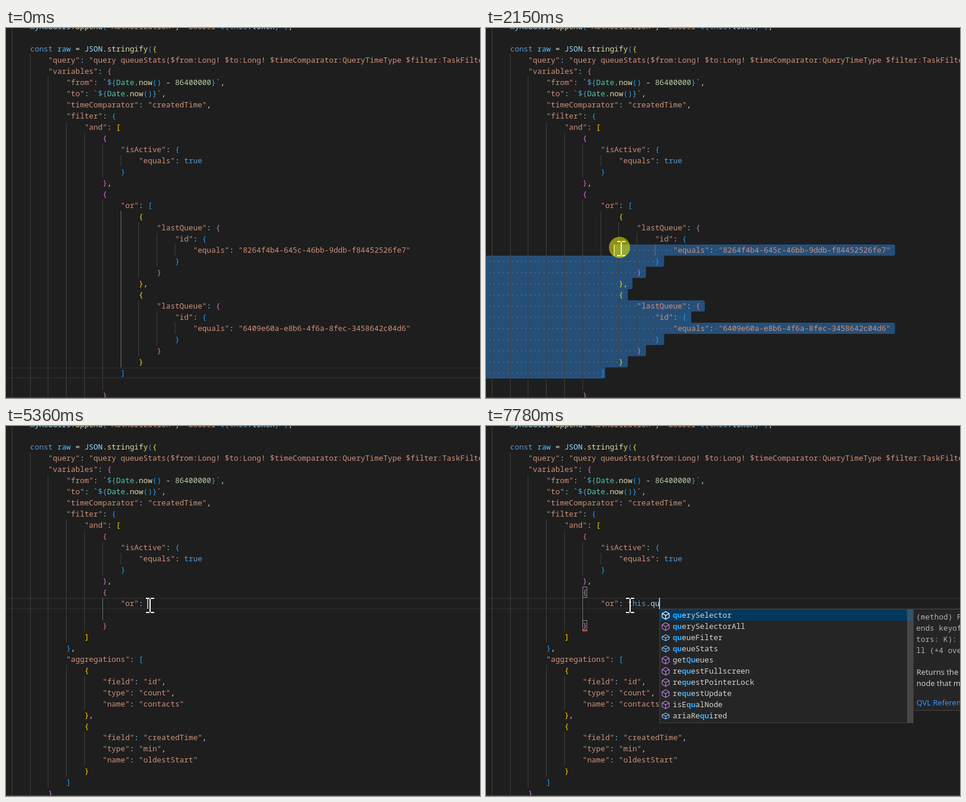
Write an HTML page with a canvas that moves like this. It is 806 by 629 pixels and loops after 8000 ms.

```html
<!DOCTYPE html>
<html lang="en">
<head>
<meta charset="utf-8">
<title>Code editor</title>
<style>
  html, body { margin: 0; height: 100%; overflow: hidden; background: #1e1e1e; }
  canvas { display: block; }
</style>
</head>
<body>
<canvas id="stage" width="806" height="629"></canvas>
<script>
const ctx = document.getElementById('stage').getContext('2d');
const LOOP = 8000, CHAR = 7.7, ROW = 19;
const colX = col => 10.2 + col * CHAR;
const lineY = line => line * ROW - 12;

// ---------- document ----------
const queue = id => ['{', '"lastQueue": {', '"id": {', `"equals": "${id}"`, '}', '}'];
const fields = (field, type, name) =>
  ['{', `"field": "${field}",`, `"type": "${type}",`, `"name": "${name}"`];
const head = [
  'myHeaders.append("Authorization", `Bearer ${this.token}`);',
  '',
  'const raw = JSON.stringify({',
  '"query": "query queueStats($from:Long! $to:Long! $timeComparator:QueryTimeType $filter:TaskFilters',
  '"variables": {',
  '"from": `${Date.now() - 86400000}`,',
  '"to": `${Date.now()}`,',
  '"timeComparator": "createdTime",',
  '"filter": {', '"and": [', '{', '"isActive": {', '"equals": true', '}', '},', '{'
];
const fullDoc = [...head, '"or": [',
  ...queue('8264f4b4-645c-46bb-9ddb-f84452526fe7'), '},',
  ...queue('6409e60a-e8b6-4f6a-8fec-3458642c04d6'), '}', ']', '', '}'];
// Each queue block closes its outer brace with the entry that follows it
const shortDoc = typed => [...head, '"or": ' + typed, '', '}', ']', '},', '"aggregations": [',
  ...fields('id', 'count', 'contacts'), '},',
  ...fields('createdTime', 'min', 'oldestStart'), '}', ']', '}'];

const STRING = '#ce9178', KEYWORD = '#569cd6', NAME = '#9cdcfe', PLAIN = '#d4d4d4', CALL = '#dcdcaa';
const BRACKETS = ['#ffd700', '#da70d6', '#179fff'];
const WORDS = { const: KEYWORD, this: KEYWORD, true: KEYWORD, raw: '#4fc1ff', Date: '#4ec9b0',
  now: CALL, stringify: CALL, append: CALL, Bearer: STRING };
const TOKEN = /"[^"]*"?|\$\{|\w+|\s+|./g;

function indent(texts) {
  let level = 1;
  return texts.map(text => {
    if (/^[}\]]/.test(text)) level--;
    const line = { text, level, end: level * 4 + text.length };
    if (/[{[]$/.test(text)) level++;
    return line;
  });
}

// ---------- timeline ----------
// time, pointer x, pointer y, caret line, caret column
const DRAG = [
  [1520, 205, 588, 31, 25], [1590, 205, 583, 31, 25], [1650, 205, 570, 31, 25], [1720, 202, 546, 30, 25],
  [1780, 198, 520, 29, 25], [1840, 199, 490, 28, 25], [1910, 203, 460, 26, 25], [1970, 209, 430, 24, 26],
  [2030, 214, 408, 23, 26], [2090, 219, 388, 21, 27], [2150, 227, 373, 20, 27], [2240, 232, 350, 19, 28],
  [2300, 236, 332, 18, 29], [2370, 240, 318, 17, 29], [2430, 246, 308, 17, 29], [2500, 252, 304, 16, 31],
  [2570, 254, 303, 16, 31], [3820, 243, 303, 16, 30], [4020, 242, 303, 16, 30]
];
const APPROACH = [[390, 552, 620], [900, 178, 554], [1180, 205, 588]];
const TYPING = [[6230, 't'], [6370, 'th'], [6500, 'thi'], [6570, 'this'], [6990, 'this.'],
  [7720, 'this.q'], [7780, 'this.qu']];
const CARET_TOGGLES = [1520, 3160, 3620, 4360, 4830, 5790, 6230, 7500, 7720];
const DELETED = 5360;
const lastAt = (list, t) => list.filter(k => k[0] <= t).pop();
const within = (t, from, to) => t >= from && t < to;

function pointerAt(t) {
  if (t < 390) return null;
  const drag = lastAt(DRAG, t);
  if (drag) return [drag[1], drag[2]];
  const now = Math.min(1180, 390 + Math.floor((t - 390) / 65.8) * 65.8);
  const [a, b] = now < 900 ? APPROACH : APPROACH.slice(1);
  const p = Math.min(1, (now - a[0]) / (b[0] - a[0])), e = p * p * (3 - 2 * p);
  return [a[1] + (b[1] - a[1]) * e, a[2] + (b[2] - a[2]) * e];
}

// ---------- drawing helpers ----------
function rect(x, y, w, h, color) {
  ctx.fillStyle = color;
  ctx.fillRect(x, y, w, h);
}
function outline(x, y, w, h, color) {
  ctx.strokeStyle = color;
  ctx.lineWidth = 1;
  ctx.strokeRect(x + .5, y + .5, w - 1, h - 1);
}
function mono(text, x, y, color, pitch = CHAR, weight = 'normal') {
  ctx.font = `${weight} ${pitch / .6}px "Noto Sans Mono", monospace`;
  ctx.fillStyle = color;
  [...text].forEach((c, i) => c !== ' ' && ctx.fillText(c, x + i * pitch, y));
}
function polyline(points, color, close) {
  ctx.beginPath();
  points.forEach(([x, y]) => ctx.lineTo(x, y));
  if (close) ctx.closePath();
  ctx.strokeStyle = color;
  ctx.lineWidth = 1.2;
  ctx.stroke();
}

// ---------- editor ----------
function drawCode(lines) {
  let depth = 2;
  lines.forEach(({ text, level }, i) => {
    let col = level * 4, template = false;
    for (const token of text.match(TOKEN) || []) {
      let color = PLAIN;
      if (token[0] === '"' || token === '`') color = STRING;
      else if (token === '${') { color = KEYWORD; template = true; }
      else if (token === '}' && template) { color = KEYWORD; template = false; }
      else if ('{[('.includes(token)) color = BRACKETS[depth++ % 3];
      else if ('}])'.includes(token)) color = BRACKETS[--depth % 3];
      else if (/^\d/.test(token)) color = '#b5cea8';
      else if (/^\w/.test(token)) color = WORDS[token] || NAME;
      else if (token === ':') color = NAME;
      mono(token, colX(col), lineY(i) + 14, color);
      col += token.length;
    }
  });
}

function drawGuides(lines, caretLine) {
  const level = i => lines[i] ? lines[i].level : 0;
  let start = caretLine, active = level(caretLine);
  if (level(start + 1) > active) active = level(++start);
  else if (level(start - 1) > active) active = level(--start);
  let first = start, last = start;
  while (level(first - 1) >= active) first--;
  while (level(last + 1) >= active) last++;
  lines.forEach((line, i) => {
    for (let k = 0; k < line.level; k++) {
      const lit = k === active - 1 && i >= first && i <= last;
      rect(Math.floor(colX(k * 4)), lineY(i), 1, ROW, lit ? '#707070' : '#404040');
    }
  });
}

function drawSelection(lines, from, col) {
  const LAST = 31;
  const right = i => i < from || i > LAST ? 0 : colX(lines[i].end) + (i < LAST ? CHAR : 0);
  for (let i = from; i <= LAST; i++) {
    const { text, level } = lines[i], x = i === from ? colX(col) : 0, r = right(i);
    ctx.fillStyle = '#264f78';
    ctx.beginPath();
    ctx.roundRect(x, lineY(i), Math.max(0, r - x), ROW,
      [0, right(i - 1) < r ? 3 : 0, right(i + 1) < r ? 3 : 0, 0]);
    ctx.fill();
    const chars = ' '.repeat(level * 4) + text;
    for (let c = i === from ? col : -1; c < chars.length; c++)
      if (c < 0 || chars[c] === ' ') rect(colX(c) + 3, lineY(i) + 9, 1.6, 1.6, 'rgba(227,228,226,.25)');
  }
}

function bracketBox(line, col) {
  const x = Math.floor(colX(col));
  rect(x, lineY(line), 8, ROW, 'rgba(0,100,0,.1)');
  outline(x, lineY(line), 8, ROW, '#888888');
}

function drawPointer([x, y], pressed) {
  const cx = Math.round(x) + 3, cy = Math.round(y) + 2;
  rect(cx - 1, cy - 11, 2, 22, '#fff');
  for (const s of [-13, 11]) {
    rect(cx - 7, cy + s, 6, 2, '#fff');
    rect(cx + 1, cy + s, 6, 2, '#fff');
  }
  if (!pressed) return;
  ctx.fillStyle = 'rgba(255,255,0,.5)';
  ctx.beginPath();
  ctx.arc(x, y, 18, 0, Math.PI * 2);
  ctx.fill();
}

// ---------- suggestions ----------
// icon kind, label, note
const KEYWORDS = [
  ['k', 'this'], ['k', 'throw'], ['s', 'throw', 'Throw Exception'], ['i', 'Touch'], ['i', 'TouchEvent'],
  ['i', 'TouchList'], ['n', 'globalThis'], ['s', 'trycatch', 'Try-Catch Statement'],
  ['i', 'transformWithVobrune', 'nolu']
];
const MEMBERS = ('f accessKey,f accessKeyLabel,m addController,m addEventListener,m after,m animate,m append,' +
  'm appendChild,f ariaAtomic,f ariaAutoComplete,f ariaBusy,f ariaChecked,m querySelector,m querySelectorAll,' +
  'f queueFilter,f queueStats,m getQueues,m requestFullscreen,m requestPointerLock,m requestUpdate,' +
  'm isEqualNode,f ariaRequired').split(',').map(s => s.split(' '));

// Positions of the query letters in the label, or null
function findLetters(label, query) {
  const hits = [];
  let at = -1;
  for (const c of query) {
    at = label.toLowerCase().indexOf(c, at + 1);
    if (at < 0) return null;
    hits.push(at);
  }
  return hits;
}

function drawIcon(kind, x, y, selected) {
  const color = selected ? '#fff' : { m: '#b180d7', f: '#75beff', i: '#75beff' }[kind] || '#c5c5c5';
  if (kind === 'k') {
    [[-7, -5, 7], [2, -5, 5], [-7, -2, 4], [-1, -2, 8], [-7, 1, 8], [3, 1, 4], [-7, 4, 5], [0, 4, 7]]
      .forEach(([dx, dy, w]) => rect(x + dx, y + dy, w, 1.2, color));
  } else if (kind === 's') {
    polyline([[x - 6, y + 6], [x - 6, y - 6], [x + 6, y - 6], [x + 6, y + 6]], color);
    for (let d = -6; d <= 6; d += 3) rect(x + d - .5, y + 5.5, 1.5, 1.5, color);
  } else if (kind === 'i') {
    for (const s of [-1, 1])
      polyline([[x + 4 * s, y - 4], [x + 6.5 * s, y - 4], [x + 6.5 * s, y + 5], [x + 4 * s, y + 5]], color);
    polyline([[x - 3, y + 1], [x, y - 2.5], [x + 3, y - 1], [x, y + 3]], color, true);
    polyline([[x - 3, y + 1], [x, y], [x + 3, y - 1]], color);
  } else if (kind === 'n') {
    mono('{}', x - 7, y + 4, color);
  } else {
    const h = kind === 'm' ? 6.5 : 5, m = kind === 'm' ? 3.2 : 2;
    polyline([[x, y - h], [x + 6, y - m], [x + 6, y + m], [x, y + h], [x - 6, y + m], [x - 6, y - m]], color, true);
    polyline([[x - 6, y - m], [x, y], [x + 6, y - m]], color);
    polyline([[x, y], [x, y + h]], color);
  }
}

function drawPanel(x, y, w, h) {
  rect(x, y, w, h, '#252526');
  outline(x, y, w, h, '#454545');
}

function drawSuggestions(items, query, col) {
  const x = Math.floor(colX(col)), y = 311, w = 432;
  const rows = items.filter(([, label]) => findLetters(label, query)).slice(0, 12);
  const h = rows.length * ROW + 4;
  drawPanel(x, y, w, h);
  rect(x + 1, y + 1, w - 2, ROW, '#04395e');
  rows.forEach(([kind, label, note = ''], i) => {
    const rowY = y + 1 + i * ROW, hits = findLetters(label, query);
    drawIcon(kind, x + 10.5, rowY + 10, i === 0);
    [...label].forEach((c, k) => {
      const hit = hits.includes(k);
      mono(c, colX(col) + 22.5 + k * CHAR, rowY + 14, hit ? '#2aaaff' : PLAIN, CHAR, hit ? 'bold' : 'normal');
    });
    mono(note, x + 421 - note.length * 6.6, rowY + 13, '#9a9a9a', 6.6);
  });
  if (items === MEMBERS)
    rect(x + w - 11, y + 1, 10, rows.length < 12 ? h - 2 : 20, 'rgba(121,121,121,.4)');
}

function drawDetails(query, col) {
  const x = Math.floor(colX(col)) + 431;
  const [code, prose] = query
    ? [['(method) ParentNode', 'ends keyof HTML', 'tors: K): El', 'll (+4 overloads)'], ['Returns the first', 'node that matches']]
    : [['(property) string', 'accessKey:', 'string'], []];
  drawPanel(x, 311, 200, 173);
  code.forEach((s, i) => mono(s, x + 5.5, 329 + i * ROW, '#b0b0b0'));
  ctx.font = '13px "Noto Sans", sans-serif';
  ctx.fillStyle = '#cccccc';
  prose.forEach((s, i) => ctx.fillText(s, x + 6, 423 + i * ROW));
  ctx.fillStyle = '#3794ff';
  ctx.fillText('QVL Reference', x + 6, 475);
}

// ---------- scene ----------
function draw(t) {
  const deleted = t >= DELETED;
  const typed = (lastAt(TYPING, t) || [0, ''])[1];
  const lines = indent(deleted ? shortDoc(typed) : fullDoc);
  const [, , , line, dragCol] = lastAt(DRAG, t) || [0, 0, 0, 31, 25];
  const col = deleted ? 30 + typed.length : dragCol;
  const selecting = !deleted && (line < 31 || col < 25);

  rect(0, 0, 806, 629, '#1e1e1e');
  if (selecting) drawSelection(lines, line, col);
  else for (const dy of [0, ROW - 2]) rect(0, lineY(line) + dy, 806, 2, '#282828');
  drawGuides(lines, line);
  if (within(t, 1520, 1900)) { bracketBox(16, 30); bracketBox(31, 24); }
  if (t >= 5420) { bracketBox(15, 20); bracketBox(18, 20); }
  drawCode(lines);

  if (within(t, 5830, 6990) || t >= 7330)
    polyline([[164, 348], [166, 346.5], [168, 348.5], [170, 346.5], [172, 348]], '#f14c4c');
  if (CARET_TOGGLES.filter(k => k <= t).length % 2)
    rect(Math.floor(colX(col)) - 1, lineY(line), 2, ROW, '#aeafad');

  const [word, member] = typed.split('.');
  if (within(t, 6300, 6990)) drawSuggestions(KEYWORDS, word, col);
  if (t >= 7120) drawSuggestions(MEMBERS, member, col);
  if (t >= 7180) drawDetails(member, col);
  rect(0, 628, 806, 1, '#555555');

  const pointer = pointerAt(t);
  if (pointer) drawPointer(pointer, within(t, 1520, 2700) || within(t, 3820, 4360));
}

const begin = performance.now();
function tick() {
  draw((performance.now() - begin) % LOOP);
  requestAnimationFrame(tick);
}
tick();
</script>
</body>
</html>
```
